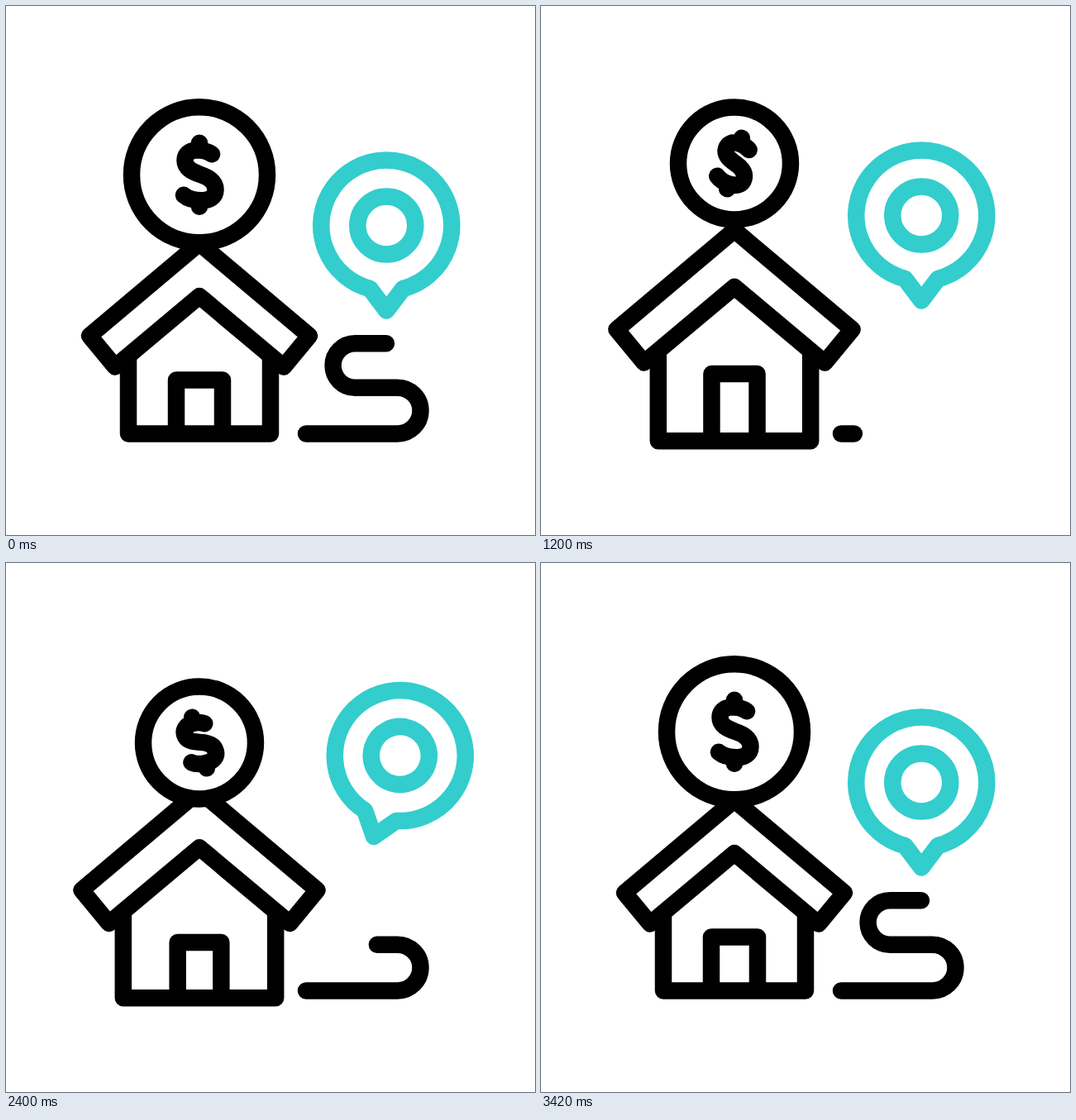
Write an HTML page that moves like this. It is 640 px wide and 640 px high and loops after 3600 ms.

```html
<!DOCTYPE html>
<html>
<head>
<meta charset="utf-8">
<style>
html, body { margin: 0; width: 100%; height: 100%; overflow: hidden; background: #fff; }
svg { display: block; }
svg * { vector-effect: non-scaling-stroke; }
</style>
</head>
<body>
<svg width="640" height="640" viewBox="0 0 640 640" fill="none" stroke="#000" stroke-width="20.5" stroke-linecap="round" stroke-linejoin="round">
  <g id="house">
    <path id="walls" stroke-linecap="butt" d="M148 418V517.5H320V418"/>
    <path id="roof" d="M101 399L234 287L367 399L336 436.5L234 351L132 436.5Z"/>
    <path id="door" stroke-linecap="butt"/>
  </g>
  <circle id="coin" cx="234" fill="#fff"/>
  <path id="dollar" d="M0-38.5V-30M15-25C9-29 4-30-3-30C-13-29.5-17.5-24-17.5-17.5C-17.5-8-9-4 1-.5C13 3.5 19.5 9 19.5 18C19.5 27 12 31 3 31C-7 31-13 29.5-19 24.5M0 31V38.5"/>
  <path id="trail" d="M363 517.5H473.6A27.9 27.9 0 0 0 473.6 461.7H422.3A26.7 26.7 0 0 1 422.3 408.3H460"/>
  <g id="pin" stroke="#33cdcd">
    <path d="M-20 76.5A79 79 0 1 1 20 76.5L0 103Z"/>
    <circle r="35"/>
  </g>
</svg>
<script>
const LOOP = 3600;
const part = id => document.getElementById(id);
const set = (id, name, value) => part(id).setAttribute(name, value);
const length = part('trail').getTotalLength();

// Cubic bezier (1/6, 0, 5/6, 1), solved by bisection
function ease(x) {
  let lo = 0, hi = 1, u = 0.5;
  for (let i = 0; i < 24; i++) {
    u = (lo + hi) / 2;
    const at = 0.5 * u * (1 - u) ** 2 + 2.5 * u * u * (1 - u) + u ** 3;
    if (at < x) lo = u; else hi = u;
  }
  return u * u * (3 - 2 * u);
}

function draw(t) {
  const span = (a, b) => ease(Math.min(1, Math.max(0, (t - a) / (b - a))));
  const pulse = (a, peak, b) => span(a, peak) - span(peak, b);

  const grow = span(200, 800) - span(2800, 3400);
  const jump = pulse(2800, 3100, 3400);
  const size = 1 + 0.072 * grow;
  const lift = 16 * jump;

  // The roof rises twice and the door stretches with it
  const first = pulse(800, 1500, 2200), second = pulse(2200, 2800, 3400);
  const scaled = `translate(234 396) scale(${size}) translate(-234 -396)`;
  set('house', 'transform', `translate(0 ${-lift}) rotate(${-6 * jump} 234 526)`);
  set('walls', 'transform', scaled);
  set('roof', 'transform', `translate(0 ${-13.5 * first - 11.5 * second}) ${scaled}`);

  const floor = 396 + 121.5 * size;
  const doorH = 65 - 5 * grow + 36 * first + 24 * second;
  const doorW = 56 - 6.5 * grow + 9.5 * first + 10.5 * second;
  set('door', 'd', `M${234 - doorW / 2} ${floor}v${-doorH}h${doorW}v${doorH}`);

  const coinSize = 1 - 0.171 * grow;
  let coinY = 204.3 - lift;
  for (let i = 0; i < 4; i++) {
    const start = 800 + 400 * i;
    coinY += (i % 2 ? 13.2 : -13.8) * pulse(start, start + 400, start + 800);
  }
  const swing = 16 * (pulse(800, 1200, 2400) - pulse(1200, 2400, 2800));
  set('coin', 'cy', coinY);
  set('coin', 'r', 82 * coinSize);
  set('dollar', 'transform', `translate(234 ${coinY}) rotate(${swing}) scale(${coinSize})`);

  const erasing = t < 1000;
  const from = erasing ? span(200, 1000) : 0;
  const to = erasing ? 1 : span(1000, 3400);
  const shown = (to - from) * length;
  set('trail', 'visibility', shown > 0.1 ? 'visible' : 'hidden');
  set('trail', 'stroke-dasharray', `${shown} ${2 * length}`);
  set('trail', 'stroke-dashoffset', -from * length);

  const go = span(2000, 2400), drift = span(2400, 3150), away = 1 - span(3150, 3400);
  const pinX = (16.5 * go + 42 * drift) * away;
  const pinY = -12 * pulse(600, 1200, 2000) - (32.5 * go + 13.5 * drift) * away;
  set('pin', 'transform', `translate(${460.3 + pinX} ${265.5 + pinY}) rotate(${18 * go * away})`);
}

function frame() {
  draw(performance.now() % LOOP);
  requestAnimationFrame(frame);
}
frame();
</script>
</body>
</html>
```
